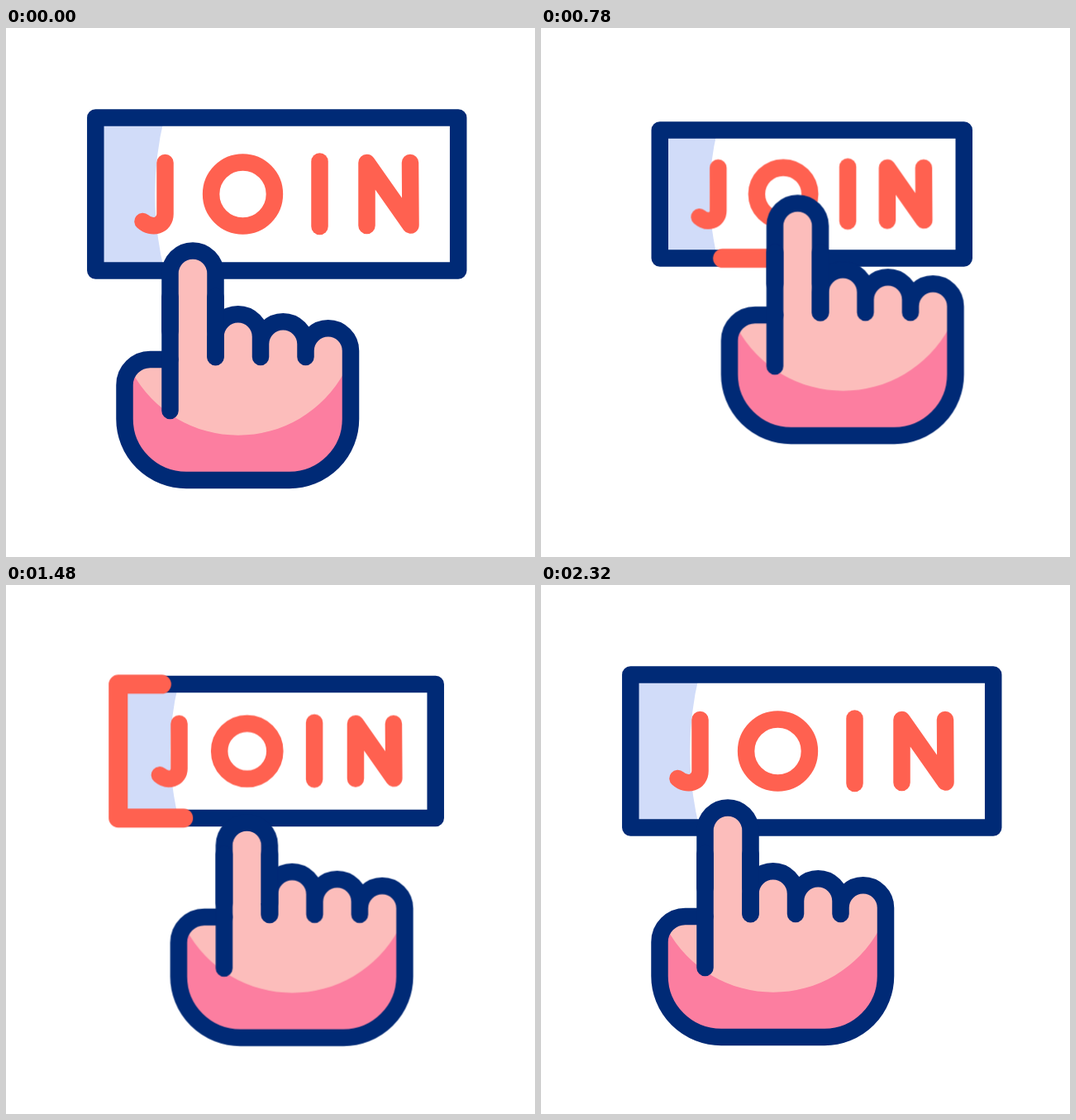
An HTML page without scripts that plays this animation: 640x640 px, repeating every 2.4 s.

```html
<!DOCTYPE html>
<html lang="en">
<head>
<meta charset="utf-8">
<title>Join button</title>
<style>
@property --s { syntax: "<number>"; inherits: true; initial-value: 1; }
@property --head { syntax: "<number>"; inherits: true; initial-value: 0; }
@property --tail { syntax: "<number>"; inherits: true; initial-value: 0; }

:root {
  --navy: #002a76;
  --red: #ff6150;
  --sky: #d1dcf9;
  --skin: #fcbdbb;
  --shade: #fc7ea0;
  --ease: cubic-bezier(.333, 0, .667, 1);
}
html, body { margin: 0; width: 100%; height: 100%; overflow: hidden; background: #fff; }
svg { display: block; width: 100vw; height: 100vh; }

.line, .ink, .trace { fill: none; stroke-linecap: round; stroke-linejoin: round; }
.line { stroke: var(--navy); stroke-width: 20.5px; }

/* line weights stay constant while the button scales */
.button {
  transform-origin: 327.75px 201px;
  transform: scale(var(--s));
  animation: squash 2.4s var(--ease) infinite;
}
.button .line, .ink { stroke-width: calc(20.5px / var(--s)); }
.ink { stroke: var(--red); }

.trace {
  stroke: var(--red);
  stroke-width: calc(23px / var(--s));
  stroke-dasharray: calc((var(--head) - var(--tail)) * 1px) 1300px;
  stroke-dashoffset: calc(var(--tail) * -1px);
  animation: head 2.4s var(--ease) infinite, tail 2.4s var(--ease) infinite,
             show 2.4s step-end infinite;
}
.hand { animation: move 2.4s var(--ease) infinite; }
.tip { animation: reach 2.4s var(--ease) infinite; }
.tip .line, .skin { fill: var(--skin); }

@keyframes squash {
  0%, 8.75% { --s: 1; }
  29.167% { --s: .819; }
  41.375% { --s: .923; }
  53.5% { --s: .817; }
  75.417%, 100% { --s: 1; }
}
@keyframes head {
  0%, 29.167% { --head: 0; }
  50%, 100% { --head: 1247.6; }
}
@keyframes tail {
  0%, 47.5% { --tail: 0; }
  69.04%, 100% { --tail: 1247.6; }
}
@keyframes show {
  0% { opacity: 0; }
  29.4% { opacity: 1; }
  69%, 100% { opacity: 0; }
}
@keyframes move {
  0%, 8.75% { transform: translate(0, 0); }
  29.167% { transform: translate(84.5px, -55.4px); }
  53%, 53.75% { transform: translate(84.5px, -25.5px); }
  75.417%, 83.75% { transform: translate(22px, 60px); }
  96.25%, 100% { transform: translate(0, 0); }
}
@keyframes reach {
  0%, 29.167% { transform: translateY(0); }
  46.04% { transform: translateY(-36px); }
  53.75% { transform: translateY(25px); }
  75.417%, 100% { transform: translateY(0); }
}
</style>
</head>
<body>
<svg viewBox="0 0 640 640" role="img" aria-label="JOIN">
  <g class="button">
    <path fill="#fff" d="M108.3 108.5H547.2V293.5H108.3Z"/>
    <path fill="var(--sky)" d="M108.3 108.5H191.5Q169 201 191.5 293.5H108.3Z"/>
    <path class="line" d="M108.3 108.5H547.2V293.5H108.3Z"/>
    <path class="trace" d="M198.75 293.5H547.2V108.5H108.3V293.5H198.75"/>
    <g class="ink">
      <path d="M192.5 163V225C192.5 239 177 244 165.5 234"/>
      <circle cx="286.5" cy="201" r="38.4"/>
      <path d="M379.5 161.5V240"/>
      <path d="M436.5 239V163L489.5 238.5L489 163"/>
    </g>
  </g>

  <g class="hand">
    <path id="palm" fill="var(--skin)" d="M198.5 401H174.5A31 31 0 0 0 143.5 432V473A74.5 74 0 0 0 218 547H343A74 74 0 0 0 417 473V390.5A27.25 27.25 0 0 0 362.5 390.5V398V382.5A27.25 27.25 0 0 0 308 382.5V398V373.5A27.25 27.25 0 0 0 253.5 373.5V398"/>
    <path class="skin" d="M198.5 325H253.5V405H198.5Z"/>
    <path fill="var(--shade)" d="M153 417A146 146 0 0 0 409 417L417 420V473A74 74 0 0 1 343 547H218A74.5 74 0 0 1 143.5 473V432Z"/>
    <path class="line" d="M198.5 401H174.5A31 31 0 0 0 143.5 432V473A74.5 74 0 0 0 218 547H343A74 74 0 0 0 417 473V390.5A27.25 27.25 0 0 0 362.5 390.5V398V382.5A27.25 27.25 0 0 0 308 382.5V398V373.5A27.25 27.25 0 0 0 253.5 373.5V398"/>
    <g class="tip">
      <path class="line" d="M198.5 367V297A27.5 27.5 0 0 1 253.5 297V367"/>
    </g>
    <path class="line" d="M198.5 463V325M253.5 398V325"/>
  </g>
</svg>
</body>
</html>
```
